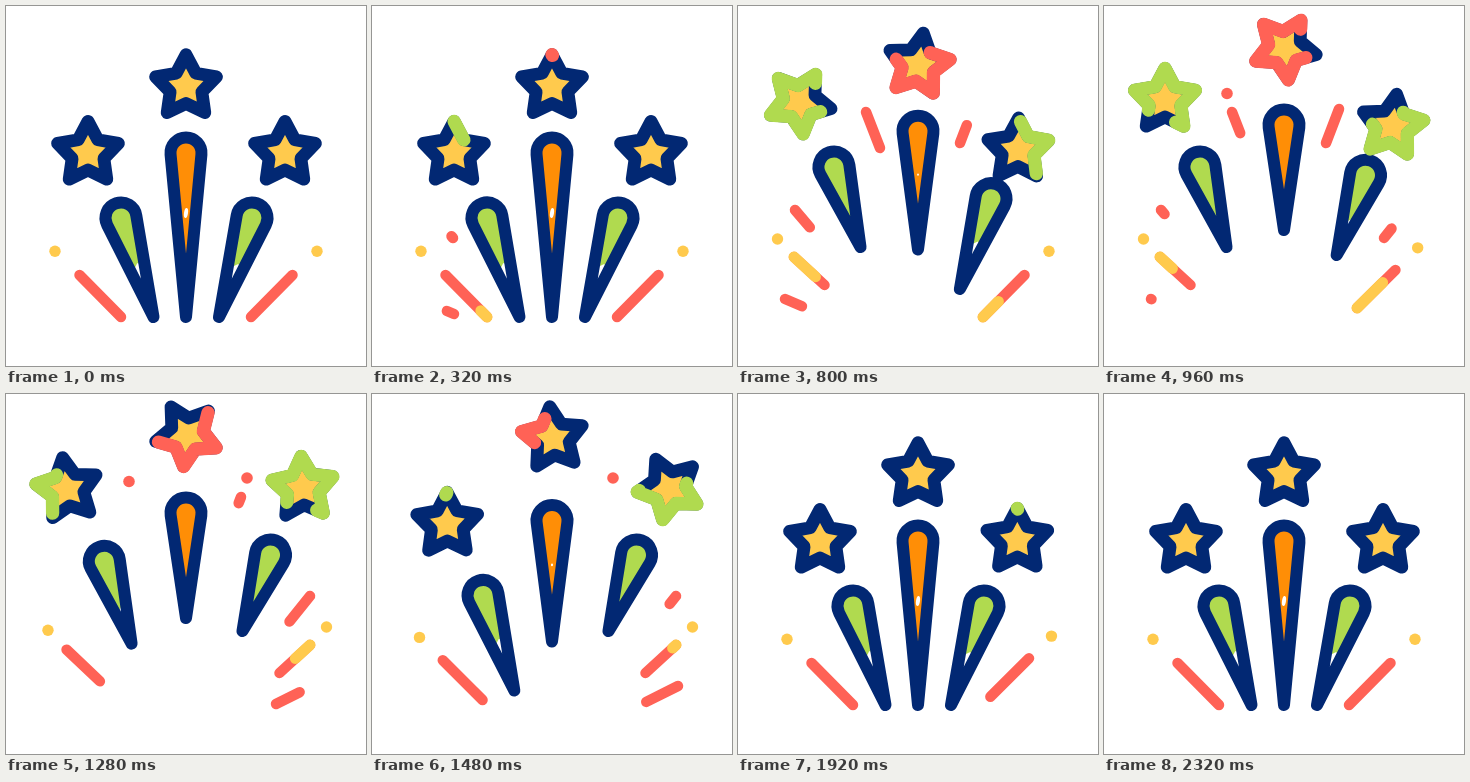
An HTML page that plays this animation: 360 by 360 pixels, repeating every 2.4 s.

```html
<!DOCTYPE html>
<html lang="en">
<head>
<meta charset="utf-8">
<title>Fireworks</title>
<style>
  html, body { margin: 0; width: 100%; height: 100%; overflow: hidden; background: #fff; }
  svg { display: block; width: 100vw; height: 100vh; }
  path, line { stroke-linecap: round; stroke-linejoin: round; }
</style>
</head>
<body>
<svg id="stage" viewBox="0 0 360 360"></svg>
<script>
const LOOP = 2400, STEP = 40;
const NAVY = '#022873', RED = '#ff6256', GREEN = '#b0da4f', YELLOW = '#ffca4d', ORANGE = '#ff8e06';
const stage = document.getElementById('stage');

function set(node, attrs) {
  for (const key in attrs) node.setAttribute(key, attrs[key]);
}
function add(tag, attrs, parent = stage) {
  const node = document.createElementNS('http://www.w3.org/2000/svg', tag);
  set(node, attrs);
  return parent.appendChild(node);
}
function show(node, on) {
  set(node, { visibility: on ? 'visible' : 'hidden' });
}
function drawLine(node, a, b) {
  set(node, { x1: a[0], y1: a[1], x2: b[0] + .01, y2: b[1] });
}

const mix = (p, q, k) => p.map((v, i) => v + (q[i] - v) * k);
const shift = (p, move, k) => p.map((v, i) => v + move[i] * k);
const ramp = (t, from, to) => Math.min(1, Math.max(0, (t - from) / (to - from)));
const smooth = u => u * u * (3 - 2 * u);
const cubic = u => u < .5 ? 4 * u ** 3 : 1 - 4 * (1 - u) ** 3;

// Up and back down again with soft ends.
const hump = (t, rise, top, fall, rest) => smooth(ramp(t, rise, top)) - smooth(ramp(t, fall, rest));

function rocket({ head, tip, headMove, tipMove, fill, delay, slim }) {
  const R = 15.5;
  const group = add('g', {});
  const body = add('path', { fill }, group);
  const gap = add(slim ? 'ellipse' : 'path', { fill: '#fff' }, group);
  const rim = add('path', { fill: 'none', stroke: NAVY, 'stroke-width': 12 }, group);
  return time => {
    const k = hump(time - delay, 310, 800, 1190, 1600);
    const [x, y] = shift(head, headMove, k);
    const [tx, ty] = shift(tip, tipMove, k);
    const len = Math.hypot(tx - x, ty - y), sin = R / len;
    const px = R * Math.sqrt(1 - sin * sin), py = R * sin;
    const d = `M0 ${len}L${-px} ${py}A${R} ${R} 0 1 1 ${px} ${py}Z`;
    const turn = Math.atan2(x - tx, ty - y) * 180 / Math.PI;
    set(group, { transform: `translate(${x} ${y}) rotate(${turn})` });
    set(body, { d });
    set(rim, { d });
    if (slim) {
      const cy = len * .366, size = 1 - k;
      set(gap, { cy, rx: 2 * Math.sqrt(size), ry: 5 * size, transform: `rotate(8 0 ${cy})` });
    } else {
      const top = len * (.46 + .15 * k ** 3);
      set(gap, { d: `M-9 ${top + 10}L1.5 ${top}L9 ${top + 7}L0 ${len}Z` });
    }
  };
}

const starPath = 'M' + Array.from({ length: 10 }, (_, i) => {
  const r = i % 2 ? 16.7 : 32, a = (i / 10 - .25) * 2 * Math.PI;
  return `${(r * Math.cos(a)).toFixed(2)} ${(r * Math.sin(a)).toFixed(2)}`;
}).join('L') + 'Z';

function star({ at, move, glow, delay }) {
  const group = add('g', {});
  add('path', { d: starPath, fill: YELLOW, stroke: NAVY, 'stroke-width': 12.8 }, group);
  const trail = add('path', { d: starPath, fill: 'none', stroke: glow, 'stroke-width': 13.3, pathLength: 1 }, group);
  return time => {
    const t = time - delay;
    const [x, y] = shift(at, move, hump(t, 400, 850, 1250, 1620));
    const turn = .4 * cubic(ramp(t, 330, 1590));
    set(group, { transform: `translate(${x} ${y}) rotate(${turn * 360})` });

    // The coloured trail goes round twice; its head hurries, its tail lags.
    const run = ramp(t, 230, 1520);
    const from = 2 * smooth(run ** 1.65), to = 2 * smooth(run ** .75);
    const len = Math.max(.004, to - from), start = (from - turn + 2) % 1;
    set(trail, { 'stroke-dasharray': `${len} ${1 - len}`, 'stroke-dashoffset': 1 - start });
    show(trail, t >= 150 && t <= 1700);
  };
}

// A red streak with its yellow dot; side is -1 on the left, 1 on the right.
function streak(side, moveDelay, glowDelay) {
  const place = (x, y) => [180 + side * x, y];
  const base = add('line', { stroke: RED, 'stroke-width': 10.5 });
  const glow = add('line', { stroke: YELLOW, 'stroke-width': 11 });
  const dot = add('circle', { r: 5.7, fill: YELLOW });
  return time => {
    const k = hump(time - moveDelay, 340, 740, 1120, 1600), t = time - glowDelay;
    const low = mix(place(65, 311), place(93.5, 279), k);
    const high = mix(place(106.5, 269), place(124, 251), k);
    const [cx, cy] = mix(place(131, 245.3), place(140.5, 233), k);
    drawLine(base, low, high);
    drawLine(glow, mix(low, high, ramp(t, 640, 1180)), mix(low, high, ramp(t, 240, 780)));
    show(glow, t >= 240 && t < 1180);
    set(dot, { cx, cy });
  };
}

// A dash that grows along its way, then its tail catches up.
function spark(from, to, start) {
  const node = add('line', { stroke: RED, 'stroke-width': 10.5 });
  return time => {
    const t = time - start;
    drawLine(node, mix(from, to, ramp(t, 370, 710)), mix(from, to, ramp(t, 0, 320)));
    show(node, t >= 0 && t < 710);
  };
}

function flash([cx, cy], start) {
  const node = add('circle', { cx, cy, r: 5.8, fill: RED });
  return time => show(node, time >= start && time < start + 440);
}

const parts = [
  streak(-1, 0, 0),
  streak(1, 480, 360),
  rocket({ head: [115, 212], tip: [147.5, 311], headMove: [-19, -51], tipMove: [-25, -70], fill: GREEN, delay: 0 }),
  rocket({ head: [180, 147], tip: [180, 311], headMove: [0, -28], tipMove: [0, -87], fill: ORANGE, delay: 150, slim: true }),
  rocket({ head: [246, 212], tip: [213, 311], headMove: [18.5, -51], tipMove: [23.5, -74], fill: GREEN, delay: 285 }),
  star({ at: [82, 147.3], move: [-21, -53], glow: GREEN, delay: 0 }),
  star({ at: [180, 80.7], move: [1, -40], glow: RED, delay: 160 }),
  star({ at: [279, 147.3], move: [18, -53], glow: GREEN, delay: 330 }),
  spark([82, 308], [47, 293], 255),
  spark([81, 232], [57, 204], 300),
  spark([142, 142], [128, 106], 450),
  spark([222, 137], [235, 103], 632),
  spark([280, 232], [304, 202], 860),
  spark([270, 310], [306, 292], 1070),
  flash([123, 87.5], 860),
  flash([241, 84], 1180)
];

const origin = performance.now();
function frame() {
  const time = (performance.now() - origin) % LOOP;
  const step = Math.floor(time / STEP) * STEP;
  for (const draw of parts) draw(step);
  requestAnimationFrame(frame);
}
frame();
</script>
</body>
</html>
```
